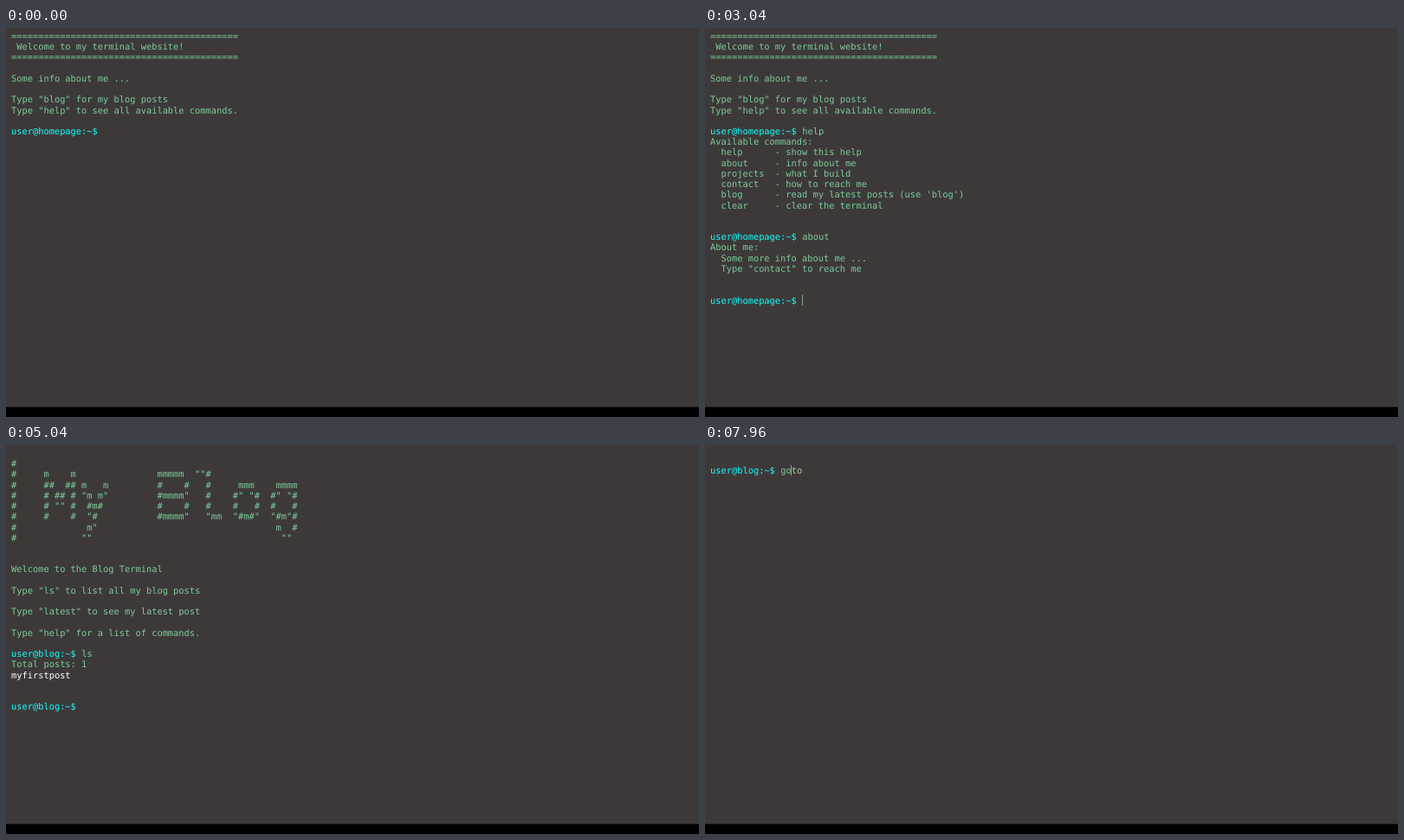
Recreate the animation shown at these times as an HTML page with a canvas. Size 800 by 450 pixels, loop 8000 ms.

```html
<!DOCTYPE html>
<html lang="en">
<head>
<meta charset="utf-8">
<title>Terminal website</title>
<style>
  html, body { margin: 0; width: 100%; height: 100%; overflow: hidden; background: #3e3939; }
  canvas { display: block; width: 800px; height: 450px; }
</style>
</head>
<body>
<canvas width="800" height="450"></canvas>
<script>
const LOOP = 8000;
const LEFT = 6, TOP = 3.3, LINE = 12.22, CHAR = 6.247, BASELINE = 9.7;
const BAR_TOP = 438.5, OVERFLOW = 4.4;
const COLORS = { back: '#3e3939', text: '#78ce98', prompt: '#14ffff', post: '#ffffff', fresh: '#b9c2a6', caret: '#7fa38d' };
const HOME = 'user@homepage:~$ ', BLOG = 'user@blog:~$ ';
const POST = 'myfirstpost';

const rule = '='.repeat(42);
const welcome = [
  rule, ' Welcome to my terminal website!', rule, '',
  'Some info about me ...', '',
  'Type "blog" for my blog posts',
  'Type "help" to see all available commands.', ''
];
const homeHelp = `Available commands:
  help      - show this help
  about     - info about me
  projects  - what I build
  contact   - how to reach me
  blog      - read my latest posts (use 'blog')
  clear     - clear the terminal`.split('\n');
const about = ['About me:', '  Some more info about me ...', '  Type "contact" to reach me'];
const cleared = ['Type "help" for commands.', '', ''];
const blogIntro = `
#
#     m    m               mmmmm  ""#
#     ##  ## m   m         #    #   #     mmm    mmmm
#     # ## # "m m"         #mmmm"   #    #" "#  #" "#
#     # "" #  #m#          #    #   #    #   #  #   #
#     #    #  "#           #mmmm"   "mm  "#m#"  "#m"#
#             m"                                 m  #
#            ""                                   ""


Welcome to the Blog Terminal

Type "ls" to list all my blog posts

Type "latest" to see my latest post

Type "help" for a list of commands.
`.split('\n');
const posts = ['Total posts: 1', POST];
const blogHelp = `Available commands:
  help      - show this help
  goto [file] - displays the content of a post by redirecting to its static page (e.g., 'goto post')
  grep [pattern] - searches post names for a pattern (e.g., 'grep post')
  ls        - list all available blog posts
  latest    - go to the most recent post (last entry in POSTLIST.txt)
  exit      - return to the main site terminal
  clear     - clear the terminal`.split('\n');

// Each scene starts when a command is entered and then types the next one.
const scenes = [
  { at: 0, host: HOME, page: welcome, caret: 320, cmd: 'help', from: 800, key: 50 },
  { at: 1160, host: HOME, output: homeHelp, caret: 1160, cmd: 'about', from: 1600, key: 90 },
  { at: 2240, host: HOME, output: about, caret: 2360, cmd: 'clear', from: 3080, key: 50 },
  { at: 3360, host: HOME, page: cleared, scroll: LINE, caret: 3360, cmd: 'blog', from: 3640, key: 60 },
  { at: 4100, host: BLOG, page: blogIntro, caret: 4200, cmd: 'ls', from: 4720, key: 80 },
  { at: 5000, host: BLOG, output: posts, caret: 5120, cmd: 'help ', from: 5600, key: 110 },
  { at: 6320, host: BLOG, output: blogHelp, scroll: OVERFLOW, caret: 6360, cmd: 'clear', from: 6900, key: 50 },
  { at: 7240, host: BLOG, page: cleared, scroll: LINE + OVERFLOW, caret: 7300, cmd: 'goto', from: 7800, key: 50, lag: 100 }
];
scenes.forEach((scene, i) => {
  const last = scenes[i - 1];
  scene.rows = scene.page || [...last.rows, last.host + last.cmd, ...scene.output, '', ''];
});

const ctx = document.querySelector('canvas').getContext('2d');
ctx.font = '10.376px "DejaVu Sans Mono", monospace';
ctx.textRendering = 'geometricPrecision';

function write(text, column, y, color) {
  ctx.fillStyle = color;
  ctx.fillText(text, LEFT + column * CHAR, y + BASELINE);
}

function writeRow(row, y) {
  const host = [HOME, BLOG].find(h => row.startsWith(h)) || '';
  write(host, 0, y, COLORS.prompt);
  write(row.slice(host.length), host.length, y, row === POST ? COLORS.post : COLORS.text);
}

function typedCount(scene, t) {
  const count = Math.floor((t - scene.from) / scene.key) + 1;
  return Math.max(0, Math.min(scene.cmd.length, count));
}

function caretVisible(scene, t) {
  return t >= scene.from || (t >= scene.caret && (t - scene.caret) % 480 < 260);
}

function draw(t) {
  const scene = scenes.findLast(s => s.at <= t);
  const top = TOP - (scene.scroll || 0);
  ctx.fillStyle = COLORS.back;
  ctx.fillRect(0, 0, 800, 450);
  scene.rows.forEach((row, i) => writeRow(row, top + i * LINE));

  const y = top + scene.rows.length * LINE;
  const typed = typedCount(scene, t);
  const settled = typedCount(scene, t - (scene.lag || 0));
  const column = scene.host.length + settled;
  writeRow(scene.host + scene.cmd.slice(0, settled), y);
  write(scene.cmd.slice(settled, typed), column, y, COLORS.fresh);
  if (caretVisible(scene, t)) {
    ctx.fillStyle = COLORS.caret;
    ctx.fillRect(Math.floor(LEFT + column * CHAR), y, 1, 12);
  }

  ctx.fillStyle = '#000';
  ctx.fillRect(0, BAR_TOP, 800, 450 - BAR_TOP);
}

function tick() {
  draw(performance.now() % LOOP);
  requestAnimationFrame(tick);
}
tick();
</script>
</body>
</html>
```
